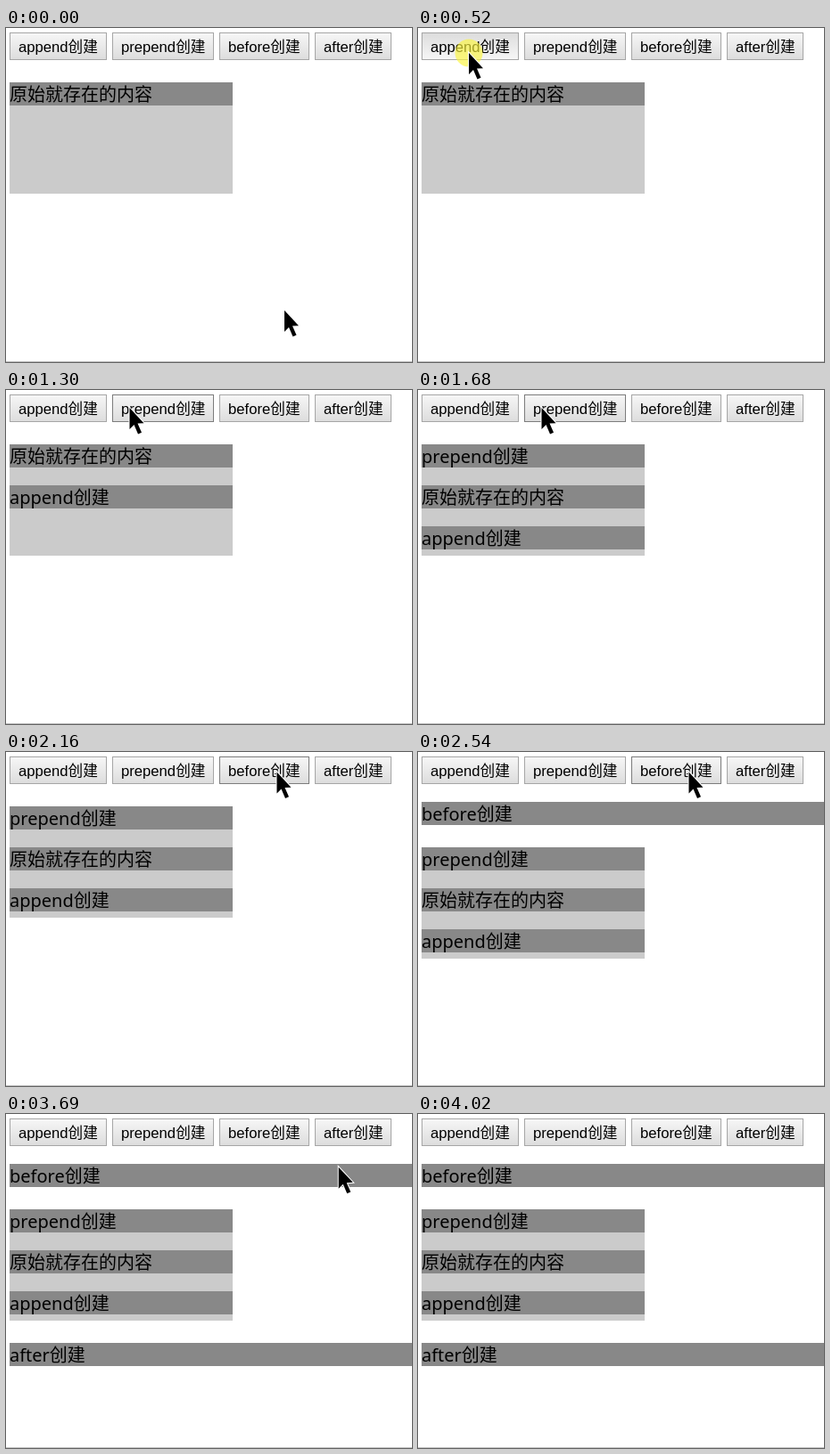
An HTML page with a canvas that plays this animation: 455 px wide and 375 px high, repeating every 4.4 s.

```html
<!DOCTYPE html>
<html lang="zh-CN">
<head>
<meta charset="utf-8">
<title>DOM insertion</title>
<style>
html, body { margin: 0; width: 100%; height: 100%; overflow: hidden; background: #fff; }
canvas { display: block; }
</style>
</head>
<body>
<canvas id="stage" width="455" height="375"></canvas>
<script>
const W = 455, H = 375, LOOP = 4400;
const ctx = document.getElementById('stage').getContext('2d');
const BUTTON_FONT = '16.67px "Liberation Sans", Arial, "Noto Sans CJK SC", sans-serif';
const ROW_FONT = '20px "Noto Sans", "Noto Sans CJK SC", "Noto Sans CJK", sans-serif';

// press and release times; the new row appears on release
const buttons = [
  { name: 'append', x: 4, w: 109, press: 520, release: 610 },
  { name: 'prepend', x: 119, w: 114, press: 1530, release: 1680 },
  { name: 'before', x: 239, w: 101, press: 2390, release: 2540 },
  { name: 'after', x: 346, w: 86, press: 3380, release: 3460 }
];
const BUTTON_Y = 5, BUTTON_H = 31;

// pointer moves: time span, number of discrete steps, end points, sag of the arc
const moves = [
  { start: 70, end: 445, steps: 6, from: [312, 317], to: [57, 28], sag: 0 },
  { start: 990, end: 1300, steps: 5, from: [57, 28], to: [138.5, 20], sag: 0 },
  { start: 1910, end: 2160, steps: 4, from: [138.5, 20], to: [303.5, 22.5], sag: 6 },
  { start: 2770, end: 3000, steps: 4, from: [303.5, 22.5], to: [370.5, 22], sag: 0 },
  { start: 3690, end: 4020, steps: 5, from: [370.5, 22], to: [392, 384], sag: 0 }
];
const arrow = [[0, 0], [0, 24], [5, 19], [9.5, 29.5], [13.5, 27.8], [9, 17.5], [16, 17.2]];

const ease = p => p * p * (3 - 2 * p);

function pointerAt(t) {
  const move = moves.filter(m => t >= m.start).pop();
  if (!move) return moves[0].from;
  const { start, end, steps, from, to, sag } = move;
  const step = Math.floor((t - start) / (end - start) * (steps - 1) + 1e-6) + 1;
  const p = ease(Math.min(step, steps) / steps);
  return [
    from[0] + (to[0] - from[0]) * p,
    from[1] + (to[1] - from[1]) * p + sag * 4 * p * (1 - p)
  ];
}

function fillRect(x, y, w, h, color) {
  ctx.fillStyle = color;
  ctx.fillRect(x, y, w, h);
}

function write(text, x, y, font) {
  ctx.font = font;
  ctx.fillStyle = '#000';
  ctx.fillText(text, x, y);
}

function drawButton({ name, x, w }, pressed, hovered) {
  const shade = ctx.createLinearGradient(0, BUTTON_Y, 0, BUTTON_Y + BUTTON_H);
  shade.addColorStop(0, pressed ? '#dcdcdc' : '#f7f7f7');
  shade.addColorStop(1, pressed ? '#f7f7f7' : '#dcdcdc');
  fillRect(x, BUTTON_Y, w, BUTTON_H, shade);
  ctx.strokeStyle = hovered && !pressed ? '#7c7c7c' : '#a6a6a6';
  ctx.lineWidth = 1;
  ctx.strokeRect(x + 0.5, BUTTON_Y + 0.5, w - 1, BUTTON_H - 1);
  write(name + '创建', x + 10, 27, BUTTON_FONT);
}

function drawRow(text, y, w) {
  fillRect(4, y, w, 26, '#888');
  write(text, 4, y + 21, ROW_FONT);
}

function drawContent(t) {
  const [append, prepend, before, after] = buttons.map(b => t >= b.release);
  const top = before ? 107 : 61;
  const rows = ['原始就存在的内容'];
  if (append) rows.push('append创建');
  if (prepend) rows.unshift('prepend创建');

  fillRect(4, top, 250, 125, '#cbcbcb');
  rows.forEach((text, i) => drawRow(text, top + i * 46, 250));
  if (before) drawRow('before创建', 56, W - 4);
  if (after) drawRow('after创建', 257, W - 4);
}

function drawPointer(x, y, pressed) {
  if (pressed) {
    ctx.fillStyle = 'rgba(250, 244, 60, 0.65)';
    ctx.beginPath();
    ctx.arc(x, y, 15.5, 0, Math.PI * 2);
    ctx.fill();
  }
  ctx.beginPath();
  arrow.forEach(([dx, dy]) => ctx.lineTo(x + dx, y + dy));
  ctx.closePath();
  ctx.strokeStyle = '#fff';
  ctx.lineWidth = 2;
  ctx.stroke();
  ctx.fillStyle = '#000';
  ctx.fill();
}

function draw(t) {
  const [x, y] = pointerAt(t);
  const isPressed = b => t >= b.press && t < b.release;
  const isHovered = b => x >= b.x && x < b.x + b.w && y >= BUTTON_Y && y < BUTTON_Y + BUTTON_H;

  fillRect(0, 0, W, H, '#fff');
  fillRect(0, 374, W, 1, '#c8c8c8');
  buttons.forEach(b => drawButton(b, isPressed(b), isHovered(b)));
  drawContent(t);
  drawPointer(x, y, buttons.some(isPressed));
}

const begin = performance.now();
function tick() {
  draw((performance.now() - begin) % LOOP);
  requestAnimationFrame(tick);
}
tick();
</script>
</body>
</html>
```
